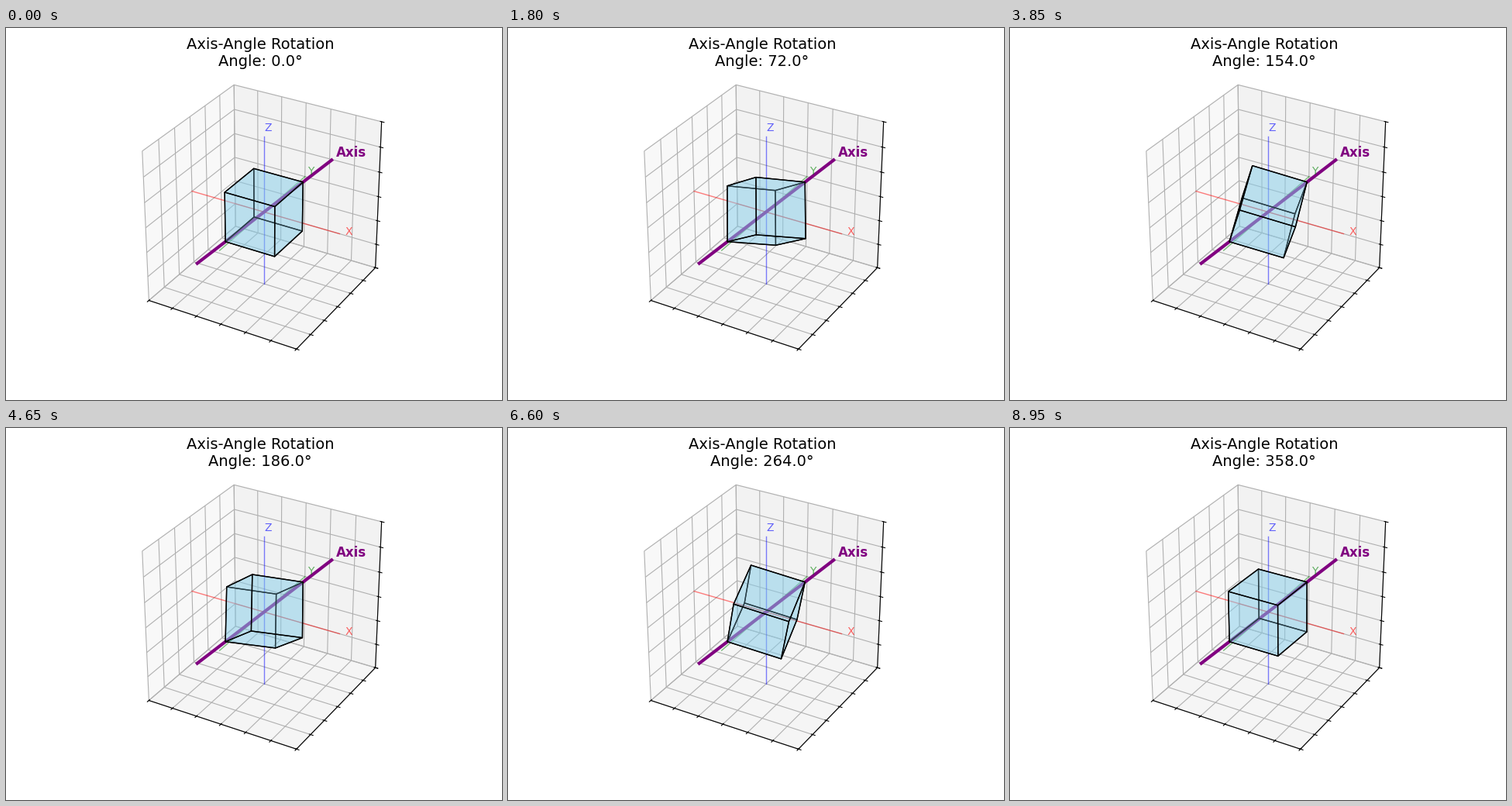
Animation, 640 px wide and 480 px high, one loop 9000 ms. Source, as a matplotlib script:

```python
import matplotlib.pyplot as plt
import numpy as np
from matplotlib.animation import FuncAnimation
from mpl_toolkits.mplot3d.art3d import Poly3DCollection

FRAMES = 180
STEP = 360 / FRAMES
LIMIT = 1.5
AXIS = np.ones(3) / np.sqrt(3)

CORNERS = np.array([
    [-1, -1, -1], [1, -1, -1], [1, 1, -1], [-1, 1, -1],
    [-1, -1, 1], [1, -1, 1], [1, 1, 1], [-1, 1, 1],
]) * 0.5
FACES = [[0, 1, 2, 3], [4, 5, 6, 7], [0, 1, 5, 4],
         [2, 3, 7, 6], [1, 2, 6, 5], [4, 7, 3, 0]]


def rotation(degrees):
    """Rodrigues rotation matrix about AXIS."""
    t = np.radians(degrees)
    x, y, z = AXIS
    k = np.array([[0, -z, y], [z, 0, -x], [-y, x, 0]])
    return np.eye(3) + np.sin(t) * k + (1 - np.cos(t)) * (k @ k)


def cube_faces(degrees):
    points = CORNERS @ rotation(degrees).T
    return [points[face] for face in FACES]


def title_text(degrees):
    return f"Axis-Angle Rotation\nAngle: {degrees:.1f}°"


def draw_line(direction, **style):
    ends = np.outer([-LIMIT, LIMIT], direction)
    ax.plot(*ends.T, **style)


fig = plt.figure(figsize=(6.4, 4.8), dpi=100)
ax = fig.add_subplot(projection="3d")
ax.set_xlim(-LIMIT, LIMIT)
ax.set_ylim(-LIMIT, LIMIT)
ax.set_zlim(-LIMIT, LIMIT)
ax.set_box_aspect([1, 1, 1])
ax.set_xticklabels([])
ax.set_yticklabels([])
ax.set_zticklabels([])

for name, color, direction in zip("XYZ", "rgb", np.eye(3)):
    draw_line(direction, color=color, alpha=0.5, linewidth=1)
    ax.text(*(direction * 1.6), name, color=color, alpha=0.6)

draw_line(AXIS, color="purple", linewidth=3)
ax.text(*(AXIS * 1.6), "Axis", color="purple", fontsize=12, fontweight="bold")

cube = Poly3DCollection(cube_faces(0), facecolors=[("skyblue", 0.3)] * 6,
                        edgecolors="black", linewidths=1)
ax.add_collection3d(cube)
title = ax.set_title(title_text(0), fontsize=14)


def update(frame):
    angle = frame * STEP
    cube.set_verts(cube_faces(angle))
    title.set_text(title_text(angle))
    return cube, title


anim = FuncAnimation(fig, update, frames=FRAMES, interval=50,
                     repeat=True, repeat_delay=0, blit=False)
plt.show()
```
